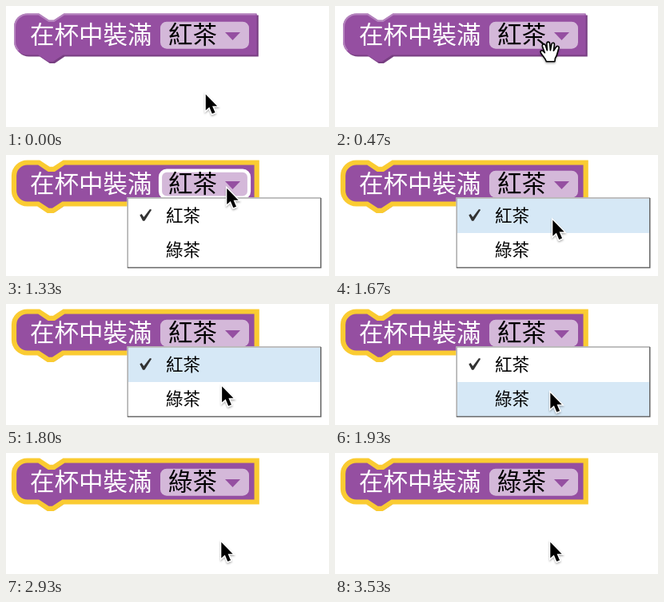
Write an HTML page that moves like this. It is 404 px wide and 152 px high and loops after 4070 ms.

```html
<!DOCTYPE html>
<html lang="zh-Hant">
<head>
<meta charset="utf-8">
<style>
  html, body { margin: 0; width: 100%; height: 100%; overflow: hidden; background: #fff; }
  svg { display: block; width: 100%; height: 100%; }
  text { font-family: "Noto Sans CJK TC", "Noto Sans CJK", sans-serif; font-size: 30.5px; }
  #label { font-weight: 500; }
  #menu text { font-size: 21.6px; }
  .row { fill: #d6e8f6; }
</style>
</head>
<body>
<svg viewBox="0 0 404 152">
  <defs>
    <path id="shape" d="M0 8A8 8 0 0 1 8 0H15l6 4h3l6-4H146V25H29.5l-6 4h-3l-6-4H8a8 8 0 0 1-8-8z"/>
    <filter id="shadow" x="-50%" y="-50%" width="200%" height="200%">
      <feDropShadow dx="0" dy="1.5" stdDeviation="1.2" flood-opacity=".35"/>
    </filter>
  </defs>

  <g transform="translate(10 9.5) scale(2.08)">
    <use href="#shape" x="1" y="1" fill="#783f82"/>
    <use href="#shape" fill="#954fa1"/>
    <path id="bevel" fill="none" stroke="#b584be"
      d="M2.7 22.3A7.5 7.5 0 0 1 .5 17V8A7.5 7.5 0 0 1 8 .5H15l6 4h3l6-4H145.5"/>
    <use id="selection" href="#shape" fill="none" stroke="#facb32" stroke-width="3"/>
  </g>
  <text id="label" x="30" y="46.5" fill="#fff">在杯中裝滿</text>
  <rect id="field" x="193" y="19.7" width="111" height="34" rx="8"
    fill="#fff" fill-opacity=".6" stroke="#fff"/>
  <text id="choice" x="203" y="46.5"></text>
  <path d="M274 33h19l-9.5 10z" fill="#954fa1"/>

  <g id="menu">
    <rect x="151.5" y="53.3" width="243" height="89" fill="#fff"/>
    <rect id="row1" class="row" x="153" y="55" width="240" height="43"/>
    <rect id="row2" class="row" x="153" y="98" width="240" height="43"/>
    <path d="M152.2 142V54H394" fill="none" stroke="#aaa" stroke-width="1.5"/>
    <path d="M393.8 54V141.6H152" fill="none" stroke="#666" stroke-width="1.5"/>
    <path d="M167.3 75.5l2.3-1.5 2.8 4 7.6-10 2.2.7-8.8 14h-2.3z" fill="#333"/>
    <text x="200" y="84">紅茶</text>
    <text x="200" y="127">綠茶</text>
  </g>

  <g id="cursor" filter="url(#shadow)">
    <path id="arrow" transform="translate(.8 2) scale(.87)" d="M0 0V23l5.2-4.6 4 9.6 4.3-1.8-4-9.2h7z"
      stroke="#fff" stroke-width="3" paint-order="stroke"/>
    <path id="hand" transform="translate(-12.5 -13.5)" fill="#fff" stroke="#000" stroke-width="1.6"
      stroke-linejoin="round"
      d="M8 26C6 20 1 17 .7 14C.7 11.5 3.5 11.5 6 15L3 7C2.5 4 6 3 7 6L9 12 8.5 4C8.5.5 12 .5 12.3 4L13 12 14.5 4.5C15 1.5 18.3 2 18 5L17 12.5 20 8C21.5 5.5 24.5 7 23.5 9.5C22 13 22 18 19 22L18.5 26z"/>
  </g>
</svg>
<script>
  const LOOP = 4070, STEP = 1000 / 15;
  const SELECT = 17, OPEN = 18, CLOSE = 42;
  const $ = id => document.getElementById(id);
  const show = (id, on) => $(id).style.display = on ? "" : "none";

  const START = [249, 109], FIELD = [275.5, 40], ITEM = [268.5, 110];

  function glide(from, to, begin, end, power, step) {
    const u = Math.min(1, Math.max(0, (step - begin) / (end - begin)));
    const p = 1 - (1 - u) ** power;
    return from.map((v, i) => v + (to[i] - v) * p);
  }

  const pointer = step => step < 23
    ? glide(START, FIELD, 4, 10, 2, step)
    : glide(FIELD, ITEM, 23, 30, 2.5, step);

  function draw(ms) {
    const step = Math.floor((ms + 4) / STEP);
    const [x, y] = pointer(step);
    const rowY = pointer(step - 1)[1]; // row hover trails the pointer by one step
    const open = step >= OPEN && step < CLOSE;
    const selected = step >= SELECT;
    const onMargin = !open && y > 54 && y < 64;

    show("selection", selected);
    show("bevel", !selected);
    show("menu", open);
    show("row1", rowY > 55 && rowY < 98);
    show("row2", rowY >= 98);
    show("hand", onMargin);
    show("arrow", !onMargin);
    $("field").setAttribute("stroke-width", y < 54 ? 4.2 : 0);
    $("choice").textContent = step < CLOSE ? "紅茶" : "綠茶";
    $("cursor").setAttribute("transform", `translate(${x} ${y})`);
  }

  const origin = performance.now();
  function tick() {
    draw((performance.now() - origin) % LOOP);
    requestAnimationFrame(tick);
  }
  tick();
</script>
</body>
</html>
```
